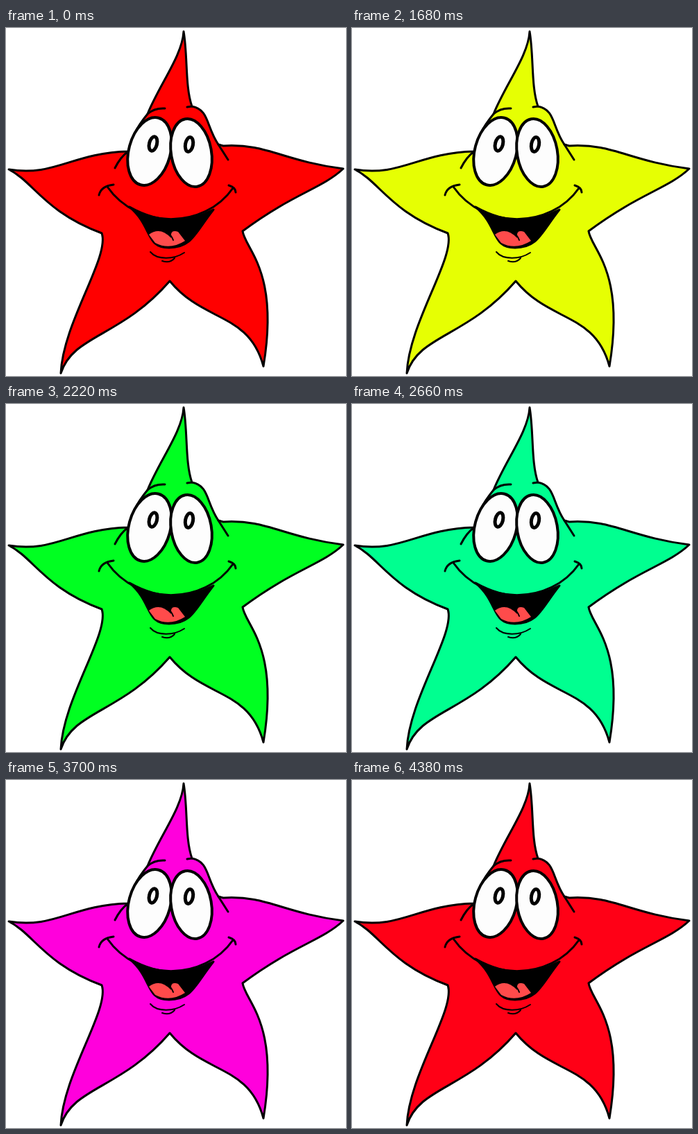
An HTML page for the animation above (4.44 s loop, 490 by 502 pixels).

```html
<!DOCTYPE html>
<html lang="en">
<head>
<meta charset="utf-8">
<title>Colour-changing star</title>
<style>
html, body { margin: 0; width: 100%; height: 100%; overflow: hidden; background: #fff; }
svg { display: block; }
.lines { fill: none; stroke: #000; stroke-width: 3; stroke-linecap: round; stroke-linejoin: round; }
.eye { fill: #fdfdfd; stroke-width: 4; }
.pupil { stroke-width: 5; }
.thin { stroke-width: 2; }
</style>
</head>
<body>
<svg width="490" height="502" viewBox="0 0 490 502">
  <g class="lines">
    <!-- Clockwise from the top tip -->
    <path id="body" d="M256 5 C262 40 258 85 268 113 C293 118 288 141 306 168 L313 170
      C375 166 400 192 486 203 C455 232 415 238 341 293
      C345 320 394 350 371 488 C350 410 285 425 236 365
      C165 447 97 442 79 498 C82 425 150 330 138 296
      C55 265 40 222 4 204 C70 215 95 180 176 178
      C182 158 186 146 204 124 C222 80 254 40 256 5Z"/>

    <ellipse class="eye" rx="30" ry="50" transform="translate(207 178) rotate(15)"/>
    <ellipse class="eye" rx="29" ry="49.5" transform="translate(267 180) rotate(-10)"/>
    <ellipse class="pupil" rx="5.5" ry="10.5" transform="translate(212 167) rotate(14)"/>
    <ellipse class="pupil" rx="5.5" ry="10.5" transform="translate(264 168) rotate(10)"/>

    <!-- Brows and cheeks -->
    <path d="M204 124 Q214 115 229 116 M261 114 L268 113 M306 168 L320 190 M176 178 Q165 186 157 202"/>

    <!-- Smile with dimples -->
    <path d="M146 229 C190 292 286 290 327 231 M134 241 Q137 228 155 226 M321 227 Q331 230 331 237"/>
    <path id="mouth" fill="#000" d="M178 258 Q240 293 299 262 C272 296 268 317 235 317 C200 317 212 287 178 258Z"/>
    <path fill="#ff4b4b" stroke="none" d="M206 298 Q222 286 238 303 Q236 290 248 294 L258 307 Q236 321 215 310Z"/>
    <path class="thin" d="M232 294 Q238 298 241 306 M208 323 C218 335 242 334 257 324 M225 336 Q236 340 243 332"/>
  </g>
</svg>
<script>
const HOLD = 200, STEP = 60, STEPS = 10, PHASE = HOLD + STEP * (STEPS - 1);
const COLOURS = [[255, 0, 0], [255, 106, 0], [255, 255, 0], [0, 255, 33], [0, 255, 255], [255, 0, 220]];
const body = document.getElementById('body');

// Each colour is held, then blends stepwise into the next
function colourAt(time) {
  const phase = Math.floor(time / PHASE);
  const from = COLOURS[phase % COLOURS.length];
  const to = COLOURS[(phase + 1) % COLOURS.length];
  const step = Math.max(0, Math.floor((time % PHASE - HOLD) / STEP) + 1);
  return `rgb(${from.map((c, i) => Math.round(c + (to[i] - c) * step / STEPS))})`;
}

const start = performance.now();
function frame() {
  body.style.fill = colourAt(performance.now() - start);
  requestAnimationFrame(frame);
}
frame();
</script>
</body>
</html>
```
